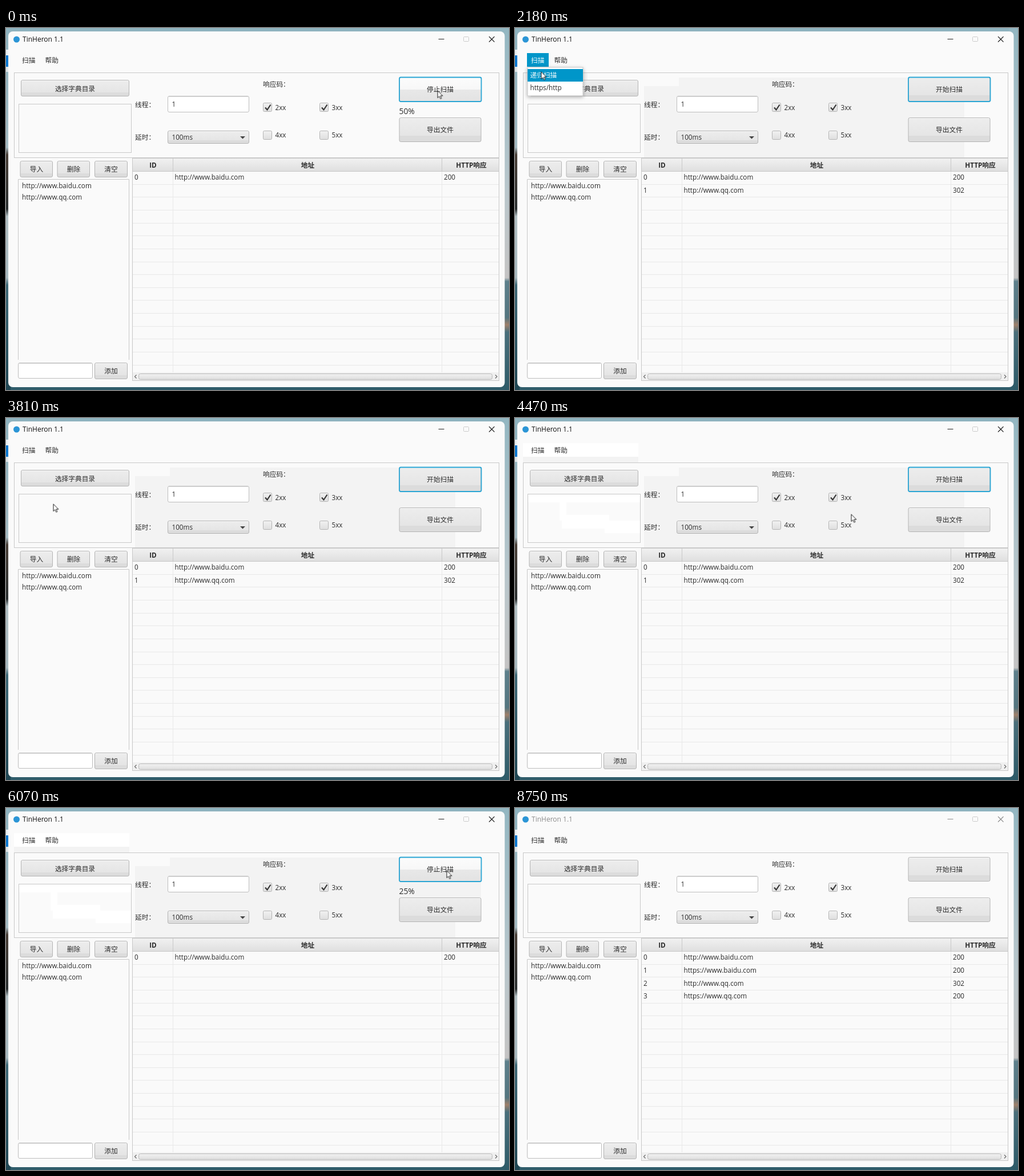
An HTML page that plays this animation: 881x635 px, repeating every 8850 ms.

```html
<!DOCTYPE html>
<html lang="zh-CN">
<head>
<meta charset="utf-8">
<title>TinHeron 1.1</title>
<style>
html, body { margin: 0; width: 100%; height: 100%; overflow: hidden; background: #fafafa; }
svg { display: block; width: 881px; height: 635px; }
text { font: 11.7px "Open Sans", "Noto Sans CJK SC", "Noto Sans CJK JP", sans-serif; fill: #2b2b2b; white-space: pre; }
.mid { text-anchor: middle; }
.head text { font-weight: 700; }
.title { font-size: 12px; fill: #111; }
.pct text { font-size: 13.8px; }
.inv text { fill: #fff; }
.btn rect { fill: url(#face); stroke: #b4b4b4; }
.btn path { stroke: #f8f8f8; }
.line { fill: none; stroke: #c8c8c8; }
.field { fill: #fff; stroke: #bdbdbd; }
.grey { fill: #f3f3f3; }
.white { fill: #fff; }
.tick { fill: none; stroke: #383838; stroke-width: 2.2; }

/* Everything changes in hard steps on one 8.85 s clock */
[class^="on-"], #cursor { animation: 8.85s step-end infinite; }
.on-active { animation-name: active; }
.on-idle { animation-name: idle; }
.on-hover { animation-name: hover; }
.on-start { animation-name: start; }
.on-stop { animation-name: stop; }
.on-first { animation-name: first; }
.on-second { animation-name: second; }
.on-mid { animation-name: midRows; }
.on-last { animation-name: last; }
.on-p0 { animation-name: p0; }
.on-p25 { animation-name: p25; }
.on-p50 { animation-name: p50; }
.on-p75 { animation-name: p75; }
.on-menu { animation-name: menu; }
.on-drop { animation-name: drop; }
.on-item1 { animation-name: item1; }
.on-item2 { animation-name: item2; }
.on-tintA { animation-name: tintA; }
.on-tintB { animation-name: tintB; }
.on-tintC { animation-name: tintC; }
.on-tintD { animation-name: tintD; }
.on-tintE { animation-name: tintE; }
#cursor { animation-name: move; }

@keyframes active { 0% { opacity: 1 } 98.87% { opacity: 0 } }
@keyframes idle { 0% { opacity: 0 } 98.87% { opacity: 1 } }
@keyframes hover { 0%, 60.79% { opacity: 1 } 7.796%, 83.954% { opacity: 0 } }
@keyframes start { 0%, 66.892% { opacity: 0 } 1.694%, 71.977% { opacity: 1 } }
@keyframes stop { 0%, 66.892% { opacity: 1 } 1.694%, 71.977% { opacity: 0 } }
@keyframes first { 0%, 68.361% { opacity: 1 } 66.892% { opacity: 0 } }
@keyframes second { 0%, 66.892% { opacity: 0 } 1.694% { opacity: 1 } }
@keyframes midRows { 0% { opacity: 0 } 69.943% { opacity: 1 } }
@keyframes last { 0% { opacity: 0 } 71.977% { opacity: 1 } }
@keyframes p0 { 0%, 68.361% { opacity: 0 } 66.892% { opacity: 1 } }
@keyframes p25 { 0%, 69.943% { opacity: 0 } 68.361% { opacity: 1 } }
@keyframes p50 { 0% { opacity: 1 } 1.694% { opacity: 0 } }
@keyframes p75 { 0%, 71.977% { opacity: 0 } 69.943% { opacity: 1 } }
@keyframes menu { 0%, 41.355% { opacity: 0 } 15.254% { opacity: 1 } }
@keyframes drop { 0%, 41.355% { opacity: 0 } 22.937% { opacity: 1 } }
@keyframes item1 { 0%, 26.44% { opacity: 0 } 24.632% { opacity: 1 } }
@keyframes item2 { 0%, 41.355% { opacity: 0 } 26.44% { opacity: 1 } }
@keyframes tintA { 0%, 98.87% { opacity: 0 } 1.694% { opacity: 1 } }
@keyframes tintB { 0%, 98.87% { opacity: 0 } 7.796% { opacity: 1 } }
@keyframes tintC { 0%, 98.87% { opacity: 0 } 44.293% { opacity: 1 } }
@keyframes tintD { 0%, 98.87% { opacity: 0 } 56.61% { opacity: 1 } }
@keyframes tintE { 0%, 98.87% { opacity: 0 } 71.977% { opacity: 1 } }
@keyframes move {
  0% { opacity: 1; transform: translate(755.5px, 109.5px) }
  7.796% { opacity: 1; transform: translate(288px, 91px) }
  9.152% { opacity: 0; transform: translate(288px, 91px) }
  12.316% { opacity: 1; transform: translate(111px, 112px) }
  13.898% { opacity: 1; transform: translate(66px, 82px) }
  15.254% { opacity: 1; transform: translate(36.5px, 57.5px) }
  16.723% { opacity: 1; transform: translate(31.5px, 52.5px) }
  18.418% { opacity: 1; transform: translate(30.5px, 53.5px) }
  24.632% { opacity: 1; transform: translate(45.5px, 76.5px) }
  26.44% { opacity: 1; transform: translate(62.5px, 100.5px) }
  28.248% { opacity: 1; transform: translate(77.5px, 112.5px) }
  30.169% { opacity: 0; transform: translate(77.5px, 112.5px) }
  35.028% { opacity: 1; transform: translate(77.5px, 109.5px) }
  42.824% { opacity: 1; transform: translate(82.5px, 150.5px) }
  44.293% { opacity: 1; transform: translate(156.5px, 178.5px) }
  45.762% { opacity: 1; transform: translate(270.5px, 181.5px) }
  47.231% { opacity: 1; transform: translate(385.5px, 181.5px) }
  49.039% { opacity: 1; transform: translate(500.5px, 177.5px) }
  50.508% { opacity: 1; transform: translate(588.5px, 168.5px) }
  51.864% { opacity: 1; transform: translate(642.5px, 155.5px) }
  53.22% { opacity: 1; transform: translate(684.5px, 146.5px) }
  54.576% { opacity: 1; transform: translate(770.5px, 138.5px) }
  56.61% { opacity: 1; transform: translate(818.5px, 133.5px) }
  60.79% { opacity: 1; transform: translate(790.5px, 121.5px) }
  62.824% { opacity: 1; transform: translate(776.5px, 113.5px) }
  64.18% { opacity: 1; transform: translate(770.5px, 110.5px) }
  65.536% { opacity: 1; transform: translate(768.5px, 108.5px) }
  66.892% { opacity: 1; transform: translate(771.5px, 109.5px) }
  83.954% { opacity: 1; transform: translate(776.5px, 152.5px) }
  85.423% { opacity: 1; transform: translate(785.5px, 236.5px) }
  87.005% { opacity: 1; transform: translate(792.5px, 330.5px) }
  88.474% { opacity: 1; transform: translate(797.5px, 402.5px) }
  90.056% { opacity: 1; transform: translate(799.5px, 437.5px) }
  98.87% { opacity: 0; transform: translate(799.5px, 437.5px) }
}
</style>
</head>
<body>
<svg viewBox="0 0 881 635">
  <defs>
    <linearGradient id="face" x2="0" y2="1">
      <stop offset="0" stop-color="#ededed"/><stop offset=".76" stop-color="#e5e5e5"/>
      <stop offset=".76" stop-color="#dcdcdc"/><stop offset="1" stop-color="#dcdcdc"/>
    </linearGradient>
    <linearGradient id="lit" x2="0" y2="1">
      <stop offset="0" stop-color="#fcfcfc"/><stop offset=".5" stop-color="#f7f7f7"/>
      <stop offset=".5" stop-color="#e8e8e8"/><stop offset="1" stop-color="#e3e3e3"/>
    </linearGradient>
    <linearGradient id="bar" x2="0" y2="1">
      <stop offset="0" stop-color="#f1f1f1"/><stop offset="1" stop-color="#dfdfdf"/>
    </linearGradient>
    <linearGradient id="left" x2="0" y2="1">
      <stop offset="0" stop-color="#8fb3bf"/><stop offset=".33" stop-color="#a5bcc4"/>
      <stop offset=".35" stop-color="#4a4038"/><stop offset=".5" stop-color="#2a2f30"/>
      <stop offset=".52" stop-color="#b3c1c5"/><stop offset=".69" stop-color="#a9bac0"/>
      <stop offset=".71" stop-color="#3f6a78"/><stop offset="1" stop-color="#1f4653"/>
    </linearGradient>
    <linearGradient id="right" x2="0" y2="1">
      <stop offset="0" stop-color="#93b6c1"/><stop offset=".45" stop-color="#b9c6cb"/>
      <stop offset=".69" stop-color="#c4c3c3"/><stop offset=".7" stop-color="#5d7f8b"/>
      <stop offset=".8" stop-color="#54757f"/><stop offset=".82" stop-color="#a0806a"/>
      <stop offset=".84" stop-color="#4a6f7b"/><stop offset="1" stop-color="#2d5a68"/>
    </linearGradient>
    <filter id="soft" x="-20%" y="-20%" width="140%" height="150%">
      <feDropShadow dx="0" dy="2" stdDeviation="3" flood-opacity=".3"/>
    </filter>
    <g id="box">
      <rect x=".5" y=".5" width="15" height="15" rx="2" fill="url(#bar)" stroke="#b4b4b4"/>
    </g>
  </defs>

  <!-- desktop and window -->
  <rect width="881" height="635" fill="#8fb3bf"/>
  <rect width="12" height="635" fill="url(#left)"/>
  <rect y="38" width="4" height="10" fill="#eef2f4"/>
  <rect y="48" width="4" height="20" fill="#0a79d0"/>
  <rect y="68" width="4" height="9" fill="#dfe6e9"/>
  <rect x="865" width="16" height="635" fill="url(#right)"/>
  <rect x="8" y="622" width="865" height="13" fill="#2f5c6a"/>
  <rect x="4" y="6" width="869.5" height="624" rx="8" fill="#fafafa"/>

  <circle cx="18.5" cy="20" r="5.5" fill="#2b95d6"/>
  <g class="on-active">
    <text class="title" x="29" y="24">TinHeron 1.1</text>
    <path d="M757.5 19.5h10M846 15l9.500 9.500M855.500 15l-9.500 9.500" fill="none" stroke="#222" stroke-width="1.1"/>
  </g>
  <g class="on-idle" opacity="0">
    <text class="title" x="29" y="24" style="fill:#8d8d8d">TinHeron 1.1</text>
    <path d="M757.5 19.5h10M846 15l9.500 9.500M855.500 15l-9.500 9.500" fill="none" stroke="#8d8d8d" stroke-width="1.1"/>
  </g>
  <rect x="801.5" y="15.5" width="9" height="8" rx="1" fill="none" stroke="#cbcbcb"/>

  <!-- faint tints left on the panels -->
  <g class="on-tintA"><rect class="grey" x="226" y="102" width="561" height="126"/></g>
  <g class="on-tintB"><rect class="grey" x="287" y="87" width="500" height="15"/></g>
  <g class="on-tintC">
    <rect class="white" x="14" y="44" width="202" height="24"/>
    <rect class="grey" x="14" y="68" width="202" height="10"/>
    <path class="white" d="M23 134h196v14H90v22h75v10h54v22h-62v-8H82v-14h-4v-32H23z"/>
  </g>
  <g class="on-tintD">
    <rect class="grey" x="787" y="129" width="45" height="28"/>
  </g>
  <g class="on-tintE">
    <rect class="grey" x="226" y="87" width="61" height="15"/>
    <rect class="grey" x="787" y="87" width="45" height="141"/>
  </g>

  <text x="28" y="61">扫描</text>
  <text x="68.500" y="61">帮助</text>
  <g class="on-menu inv" opacity="0">
    <rect x="21" y="44" width="38" height="24" fill="#0096c9"/>
    <text x="28" y="61">扫描</text>
  </g>

  <!-- options -->
  <rect class="line" x="14.500" y="78.500" width="849" height="149"/>
  <rect class="line" x="22.500" y="133.500" width="197" height="85"/>
  <g class="btn mid">
    <rect x="26.500" y="91.500" width="189" height="28" rx="2.500"/>
    <path d="M28 92.500h186"/>
    <text x="121" y="110.500">选择字典目录</text>
  </g>
  <text x="226" y="138.500">线程：</text>
  <text x="226" y="196">延时：</text>
  <text x="450" y="103">响应码：</text>
  <rect class="field" x="283.500" y="119.500" width="142" height="28" rx="2.500"/>
  <path d="M285 120.500h139" stroke="#dcdcdc"/>
  <text x="290.500" y="138">1</text>
  <g class="btn">
    <rect x="283.500" y="180.500" width="142" height="22" rx="2.500"/>
    <path d="M285 181.500h139"/>
    <text x="290.500" y="196">100ms</text>
  </g>
  <path d="M410 190h9l-4.500 4.500z" fill="#444"/>
  <use href="#box" x="450" y="131"/><use href="#box" x="549" y="131"/>
  <use href="#box" x="450" y="180"/><use href="#box" x="549" y="180"/>
  <path class="tick" d="M454 139.500l3.500 4 6-9M553 139.500l3.500 4 6-9"/>
  <text x="471.500" y="143.500">2xx</text><text x="570.500" y="143.500">3xx</text>
  <text x="471.500" y="192">4xx</text><text x="570.500" y="192">5xx</text>

  <g class="btn mid">
    <rect x="689" y="86.500" width="143" height="42" rx="2.500"/>
    <path d="M691 87.500h139"/>
    <rect x="689" y="157.500" width="143" height="42" rx="2.500"/>
    <path d="M691 158.500h139"/>
    <text x="760.500" y="183">导出文件</text>
  </g>
  <g class="on-hover"><rect x="690" y="87" width="142" height="42" rx="2" fill="url(#lit)"/></g>
  <g class="on-active">
    <rect x="689" y="86.500" width="143.500" height="42.500" rx="2.500" fill="none" stroke="#29a5d4" stroke-width="1.800"/>
  </g>
  <g class="on-start mid"><text x="760.500" y="112">开始扫描</text></g>
  <g class="on-stop mid"><text x="760.500" y="112">停止扫描</text></g>
  <g class="pct">
    <g class="on-p0"><text x="688.500" y="151">0%</text></g>
    <g class="on-p25"><text x="688.500" y="151">25%</text></g>
    <g class="on-p50"><text x="688.500" y="151">50%</text></g>
    <g class="on-p75"><text x="688.500" y="151">75%</text></g>
  </g>

  <!-- address list -->
  <g class="btn mid">
    <rect x="25" y="233.500" width="56.500" height="28" rx="2.500"/>
    <rect x="90" y="233.500" width="56.500" height="28" rx="2.500"/>
    <rect x="155.500" y="233.500" width="57" height="28" rx="2.500"/>
    <rect x="155.500" y="587.500" width="57" height="28" rx="2.500"/>
    <path d="M27 234.500h53M92 234.500h53M157 234.500h54M157 588.500h54"/>
    <text x="53.500" y="251.500">导入</text>
    <text x="118.500" y="251.500">删除</text>
    <text x="184" y="251.500">清空</text>
    <text x="184" y="605.500">添加</text>
  </g>
  <path class="line" d="M21.500 582v-316.500h194V582"/>
  <text x="28" y="280.500">http://www.baidu.com</text>
  <text x="28" y="301">http://www.qq.com</text>
  <rect class="field" x="21.500" y="587.500" width="130" height="27" rx="2.500"/>
  <path d="M23 588.500h127" stroke="#dcdcdc"/>

  <!-- result table -->
  <rect x="222" y="229" width="642" height="22" fill="url(#bar)"/>
  <path d="M222 274.500h642M222 296.500h642M222 319.500h642M222 342.500h642M222 364.500h642M222 387.500h642M222 410.500h642M222 432.500h642M222 455.500h642M222 477.500h642M222 500.500h642M222 523.500h642M222 545.500h642M222 568.500h642M222 591.500h642M292.500 251v353M763.500 251v353" stroke="#e8e8e8"/>
  <path class="line" d="M222 251.500h642M292.500 229v22M763.500 229v22"/>
  <g class="head mid">
    <text x="257.500" y="245">ID</text>
    <text x="528.500" y="245">地址</text>
    <text x="815" y="245">HTTP响应</text>
  </g>
  <g class="on-first">
    <text x="225" y="266">0</text><text x="295.500" y="266">http://www.baidu.com</text><text x="767" y="266">200</text>
  </g>
  <g class="on-second">
    <text x="225" y="289">1</text><text x="295.500" y="289">http://www.qq.com</text><text x="767" y="289">302</text>
  </g>
  <g class="on-mid">
    <text x="225" y="289">1</text><text x="295.500" y="289">https://www.baidu.com</text><text x="767" y="289">200</text>
    <text x="225" y="311.500">2</text><text x="295.500" y="311.500">http://www.qq.com</text><text x="767" y="311.500">302</text>
  </g>
  <g class="on-last">
    <text x="225" y="334">3</text><text x="295.500" y="334">https://www.qq.com</text><text x="767" y="334">200</text>
  </g>
  <rect x="222" y="604" width="642" height="15" fill="#f0f0f0"/>
  <rect x="232.500" y="606.500" width="619" height="10" rx="3" fill="url(#bar)" stroke="#b8b8b8"/>
  <path d="M228.500 608.500l-3 3 3 3M857 608.500l3 3-3 3" fill="none" stroke="#666" stroke-width="1.200"/>
  <rect class="line" x="221.500" y="228.500" width="642" height="390"/>

  <!-- menu -->
  <g class="on-drop" opacity="0">
    <rect class="grey" x="15" y="79" width="112" height="12"/>
    <rect x="22" y="69" width="97" height="50" fill="#fff" stroke="#c4c4c4" filter="url(#soft)"/>
    <text x="26.500" y="87">递归扫描</text>
    <text x="26.500" y="109">https/http</text>
    <g class="on-item1 inv">
      <rect x="22" y="72" width="97" height="22" fill="#0096c9"/>
      <text x="26.500" y="87">递归扫描</text>
    </g>
    <g class="on-item2 inv">
      <rect x="22" y="94" width="97" height="22" fill="#0096c9"/>
      <text x="26.500" y="109">https/http</text>
    </g>
  </g>

  <g id="cursor">
    <path d="M.5 .5v12.500l2.900-2.700 2 4.400 2-.9-2-4.300h4z" fill="#fff" stroke="#1a1a1a"/>
  </g>
</svg>
</body>
</html>
```
